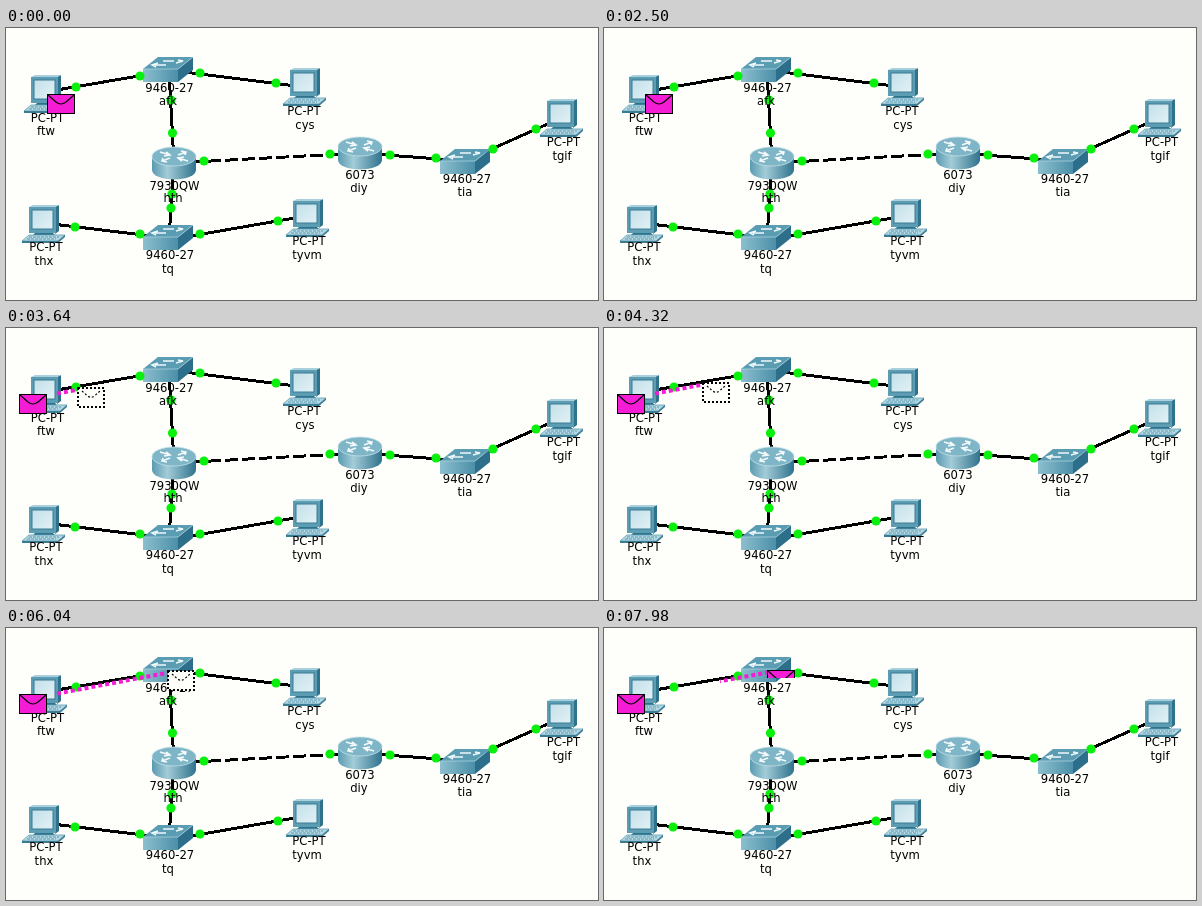
An HTML page that plays this animation: 592 by 272 pixels, repeating every 8000 ms.

```html
<!DOCTYPE html>
<html lang="en">
<head>
<meta charset="utf-8">
<title>Packet travelling through a network</title>
<style>
html, body { margin: 0; width: 100%; height: 100%; overflow: hidden; background: #fefefa; }
svg { display: block; width: 100%; height: 100%; }
text { font: 11.6px Verdana, "DejaVu Sans", sans-serif; text-anchor: middle; fill: #000; }
</style>
</head>
<body>
<svg id="stage" viewBox="0 0 592 272">
  <defs>
    <linearGradient id="front">
      <stop offset="0" stop-color="#8cbfce"/>
      <stop offset="1" stop-color="#4b8fa8"/>
    </linearGradient>
    <linearGradient id="body">
      <stop offset="0" stop-color="#5a9ab0"/>
      <stop offset=".35" stop-color="#a3ccd8"/>
      <stop offset="1" stop-color="#2f728c"/>
    </linearGradient>
    <linearGradient id="screen" x2="1" y2="1">
      <stop offset="0" stop-color="#c3e0ea"/>
      <stop offset="1" stop-color="#e2f1f5"/>
    </linearGradient>
    <g id="pc">
      <path d="M32 2 L36 0 V26 L32 29 Z" fill="#2f728c"/>
      <path d="M6 2 L10 0 H36 L32 2 Z" fill="#a9d0dc"/>
      <rect x="6" y="2" width="27" height="26" fill="#5c9db3"/>
      <rect x="9" y="5" width="21" height="19" fill="url(#screen)" stroke="#3b7c95"/>
      <path d="M12 28 H30 L33 31 H9 Z" fill="#2f728c"/>
      <path d="M6 30 H42 L35 36 H-1 Z" fill="#b4d7e2" stroke="#5c9db3" stroke-width=".8"/>
      <path d="M6 32 H36 M4 34 H33" stroke="#5c9db3" stroke-dasharray="3 1"/>
      <path d="M-1 36 H35 L42 30 V32 L35 38 H-1 Z" fill="#3b7c95"/>
    </g>
    <g id="switch">
      <path d="M15 0 H50 L35 12 H0 Z" fill="#5a9cb2"/>
      <path d="M0 12 H35 V25 H0 Z" fill="url(#front)"/>
      <path d="M35 12 L50 0 V13 L35 25 Z" fill="#2d6f8a"/>
      <path d="M0 12 H35 L50 0" fill="none" stroke="#a9d0dc" stroke-width=".8"/>
      <path d="M20 4 H31 M35 3 L40 4 L33 6 M12 8 H23 M15 6 L9 8 L13 10" fill="none" stroke="#eef8fa" stroke-width="1.5"/>
    </g>
    <g id="router">
      <path d="M0 9 V23 A22 9.5 0 0 0 44 23 V9 Z" fill="url(#body)"/>
      <ellipse cx="22" cy="9.5" rx="22" ry="9.5" fill="#7fb6c7" stroke="#c3e0e8" stroke-width=".8"/>
      <path d="M8 5 L18 8 M14 5 L18 8 L12 9 M36 14 L26 11 M30 14 L26 11 L32 10
               M26 8 L34 5 M29 4 L34 5 L33 8 M18 11 L10 14 M11 11 L10 14 L15 15"
            fill="none" stroke="#f4fafb" stroke-width="1.6"/>
    </g>
    <g id="mail">
      <rect x=".5" y=".5" width="27" height="19" fill="#f51cd6" stroke="#000"/>
      <path d="M1 1 L9 8 Q14 12 19 8 L27 1" fill="none" stroke="#000" stroke-width="1.2"/>
    </g>
    <clipPath id="reveal"><rect id="revealBox" width="30" height="0"/></clipPath>
  </defs>
  <g id="links" stroke="#000" stroke-width="3" shape-rendering="crispEdges"></g>
  <g id="devices"></g>
  <g id="lights" fill="#08f00c"></g>
  <g id="labels"></g>
  <line id="trail" stroke="#f51cd6" stroke-width="4" stroke-dasharray="4 3"/>
  <use id="sender" href="#mail" y="66"/>
  <g id="ghost">
    <rect x="1" y="1" width="26" height="19" fill="#fefefa" stroke="#000" stroke-width="2" stroke-dasharray="2 2"/>
    <path d="M5 4 L10 8.5 Q14 12 18 8.5 L23 4" fill="none" stroke="#000" stroke-width="1.2" stroke-dasharray="2 2"/>
  </g>
  <g transform="translate(163 42)"><use href="#mail" clip-path="url(#reveal)"/></g>
</svg>
<script>
const LOOP = 8000;
const $ = id => document.getElementById(id);

function add(parent, tag, attrs, text) {
  const el = document.createElementNS("http://www.w3.org/2000/svg", tag);
  set(el, attrs);
  if (text) el.textContent = text;
  $(parent).append(el);
}

function set(el, attrs) {
  for (const key in attrs) el.setAttribute(key, attrs[key]);
}

// icon, x, y, model, model x, model baseline, name, name x, name baseline
const devices = [
  ["pc", 19, 47, "PC-PT", 41.5, 94, "ftw", 40, 107],
  ["pc", 278, 40, "PC-PT", 298, 87, "cys", 299, 101],
  ["pc", 535, 71, "PC-PT", 557.5, 118, "tgif", 556, 132],
  ["pc", 17, 177, "PC-PT", 40, 223, "thx", 38, 237],
  ["pc", 281, 171, "PC-PT", 303, 217, "tyvm", 301, 231],
  ["switch", 137, 29, "9460-27", 163.5, 64, "afk", 162, 77],
  ["switch", 434, 121, "9460-27", 461, 155, "tia", 459, 168],
  ["switch", 137, 197, "9460-27", 164, 231, "tq", 162, 245],
  ["router", 146, 119, "7930QW", 168.5, 162, "hth", 167, 174],
  ["router", 332, 109, "6073", 354, 151, "diy", 353, 164]
];

// ends of each cable, then its two lights
const links = [
  [39, 64, 162, 43, 70, 59, 134, 48],
  [162, 42, 298, 59, 194, 45, 270, 55],
  [163, 43, 168, 135, 165, 72, 166.5, 105],
  [168, 135, 163, 210, 166, 166, 165, 180],
  [168, 135, 354, 125, 198, 133, 324, 126],
  [354, 125, 459, 133, 384, 127, 430, 130],
  [459, 133, 555, 90, 487, 121, 530, 101],
  [162, 210, 38, 195, 69, 199, 134, 206],
  [162, 212, 300, 188, 194, 206, 272, 193]
];

links.forEach(([x1, y1, x2, y2, ax, ay, bx, by], i) => {
  add("links", "line", { x1, y1, x2, y2, "stroke-dasharray": i === 4 ? "13 4" : "none" });
  add("lights", "circle", { cx: ax, cy: ay, r: 4.6 });
  add("lights", "circle", { cx: bx, cy: by, r: 4.6 });
});

for (const [icon, x, y, model, mx, my, name, nx, ny] of devices) {
  add("devices", "use", { href: "#" + icon, x, y });
  add("labels", "text", { x: mx, y: my }, model);
  add("labels", "text", { x: nx, y: ny }, name);
}

const START = 2860, ARRIVE = 6080;
const slope = (42 - 65) / (163 - 41);
const pathY = x => 65 + (x - 41) * slope;

// linear interpolation through [time, value] pairs
function track(t, keys) {
  if (t <= keys[0][0]) return keys[0][1];
  for (let i = 1; i < keys.length; i++) {
    const [t0, v0] = keys[i - 1], [t1, v1] = keys[i];
    if (t <= t1) return v0 + (v1 - v0) * (t - t0) / (t1 - t0);
  }
  return keys[keys.length - 1][1];
}

function draw(t) {
  const sent = t >= START;
  const x = Math.round(track(t, [[START, 41], [3100, 49], [4320, 98], [5480, 139], [ARRIVE, 163]]));
  const y = Math.round(pathY(x));
  const tail = track(t, [[6320, 51], [6700, 66], [7980, 116]]);
  const head = Math.max(x + 3, 51);

  set($("sender"), { x: sent ? 13 : 41 });
  set($("ghost"), {
    transform: `translate(${x} ${y})`,
    visibility: sent && t < ARRIVE ? "visible" : "hidden"
  });
  set($("trail"), {
    x1: tail, y1: pathY(tail) + 2.5,
    x2: head, y2: pathY(head) + 2.5,
    "stroke-dashoffset": (tail - 51) * Math.hypot(1, slope),
    visibility: sent ? "visible" : "hidden"
  });
  set($("revealBox"), { height: Math.round(track(t, [[ARRIVE, 0], [6700, 5], [7980, 8]])) });
}

function tick() {
  draw(performance.now() % LOOP);
  requestAnimationFrame(tick);
}
tick();
</script>
</body>
</html>
```
